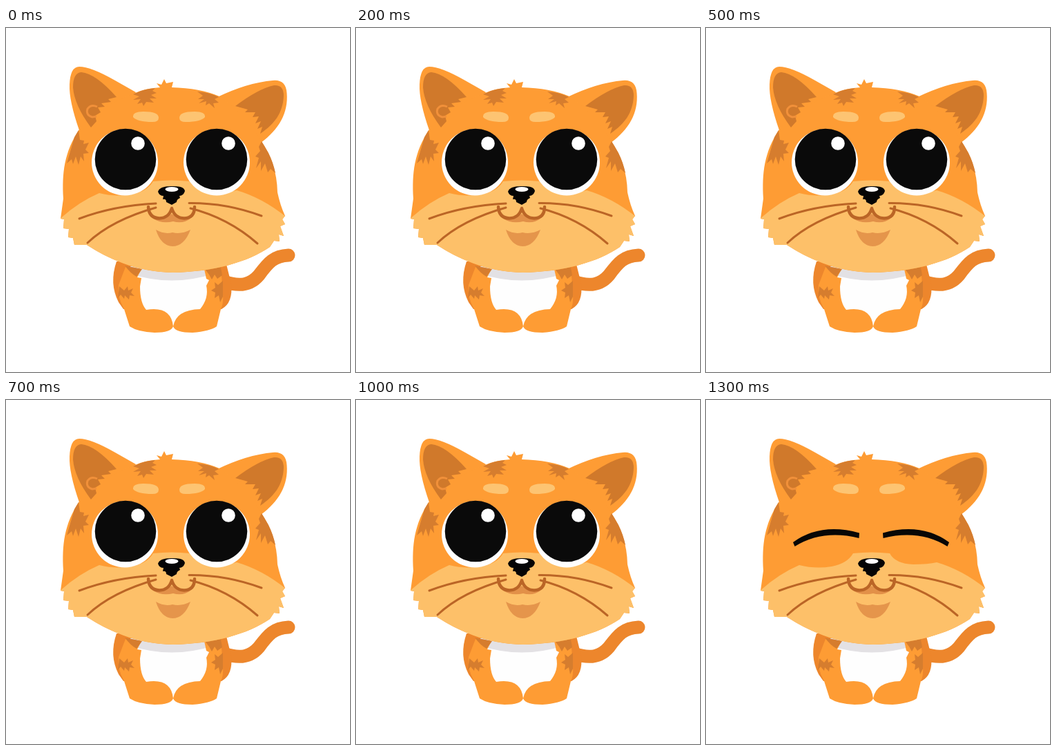
Animation of 498x498 px, one loop 1400 ms. Source, as an HTML page:

```html
<!DOCTYPE html>
<html lang="en">
<head>
<meta charset="utf-8">
<title>Blinking cat</title>
<style>
html, body { margin: 0; width: 100%; height: 100%; overflow: hidden; background: #fff; }
svg { display: block; width: 100vw; height: 100vh; }
.coat { fill: #fe9c34; }
.inner { fill: #d0792b; }
.stripe { fill: #d67d2e; }
.cream { fill: #fdc069; }
.brow { fill: #fdc472; }
.back { fill: #ed862c; }
.brown { fill: none; stroke: #bb6526; stroke-linecap: round; stroke-linejoin: round; }
</style>
</head>
<body>
<svg viewBox="0 0 498 498">
  <!-- tail -->
  <path d="M316 367C338 375 354 372 366 358C380 339 388 330 409 329" fill="none" stroke="#ed862c" stroke-width="19" stroke-linecap="round"/>

  <!-- body -->
  <path class="back" d="M160 338Q149 370 163 397L170 407H312Q329 398 326 370L318 338Z"/>
  <path fill="#fefefe" d="M185 345H298V390L283 410L242 434L202 410L187 390Z"/>
  <path fill="#e3e1e4" d="M180 345H300V356Q240 375 180 356Z"/>
  <path class="coat" d="M173 346L196 349L190 361L196 362L194 374Q194 398 203 408Q239 402 242 432Q239 441 215 441Q191 440 179 432L171 407Q161 390 163 372Z"/>
  <path class="coat" d="M311 346L287 349L290 363L294 365L290 373Q294 391 281 407Q246 408 242 432Q245 441 270 441Q295 439 305 432L311 407Q315 400 314 385Z"/>
  <path class="stripe" d="M172 344L197 349L189 360Q180 355 172 344Z"/>
  <path class="stripe" d="M164 374L171 380L176 374L177 380L184 377L181 383L186 388L179 387L178 393L172 387L171 392L166 386L162 391Z"/>
  <path class="stripe" d="M288 349L311 346L313 358L306 363L302 357L298 364L294 357Z"/>
  <path class="stripe" d="M314 366L307 372L302 368L303 376L297 380L303 383L302 391L308 387L310 397L314 389Z"/>

  <!-- ears and head -->
  <path class="coat" d="M106 148Q91 105 92 82Q93 56 106 56Q123 56 158 76L188 93L165 140Z"/>
  <path class="coat" d="M306 100Q350 79 386 76Q405 74 406.500 94C409 123 395 147 369 166L330 145Z"/>
  <path id="head" class="coat" d="M187 94Q203 87 223 86L218 80L225 82L229 74L232 80L242 78L240 86Q281 87 309 99Q348 126 369 163Q392 195 393 238Q397 257 404 272L400 277L404 284L397 287L402 301L395 299L396 309L388 308L382 317C350 339 300 353 241 354C187 353 147 333 117 314L99 314L97 304L90 303L91 291L83 290L84 277L79 276L83 247C81 210 84 180 106 147Q136 112 187 94Z"/>
  <path class="inner" d="M123 144Q99 112 97 86Q97 65 109 64Q130 66 160 100L148 103L152 107L138 109L143 114L133 115L137 122L129 127L131 135Z"/>
  <path d="M132 114Q123 110 118 117Q115 126 125 129L131 128" fill="none" stroke="#f1903a" stroke-width="3"/>
  <path class="inner" d="M332 113Q365 88 388 83Q402 82 402 98C401 122 390 138 368 153L371 143L364 146L369 135L361 138L366 128L357 129L361 122L346 122L350 118Z"/>
  <clipPath id="face"><use href="#head"/></clipPath>
  <path class="cream" clip-path="url(#face)" d="M70 284Q100 254 135 239Q158 245 182 241Q204 237 213 222Q240 219 266 222Q274 237 300 238Q322 238 334 235Q375 247 412 279V360H70Z"/>

  <!-- markings -->
  <path class="stripe" d="M88 196L99 158L105 148L107 162L113 163L112 168L120 166L115 176L120 181L112 182L113 193L108 186L105 198L101 186L97 197L95 190Z"/>
  <path class="stripe" d="M370 164L380 181Q387 195 390 210L383 204L379 209L375 196L369 207L369 193L362 203L366 188L361 186L368 178L366 172Z"/>
  <path class="stripe" d="M184 96Q199 88 216 87L212 91L218 94L210 97L218 102L208 102L214 108L203 107L199 113L197 108L190 110L195 103L184 104L193 99Z"/>
  <path class="stripe" d="M277 92Q294 93 308 100L302 103L308 108L300 109L302 116L294 109L289 112L290 106L279 109L287 103L278 103L285 98Z"/>
  <path class="brow" d="M184 129Q183 121 199 121Q221 121 221 130Q221 136 212 136Q190 136 184 129Z"/>
  <path class="brow" d="M288 129Q289 121 273 121Q251 121 251 130Q251 136 260 136Q282 136 288 129Z"/>

  <!-- eyes -->
  <g id="open"></g>
  <g id="shut" fill="#080706">
    <path d="M126 206Q166 177 222 192.500L221.500 200Q169 187 128.500 212Z"/>
    <path d="M352 206Q312 177 256 192.500L256.500 200Q309 187 349.500 212Z"/>
  </g>

  <!-- nose, mouth, whiskers -->
  <path fill="#e29048" d="M213 276Q230 277 240 269Q250 277 267 276Q256 284 242 280Q226 284 213 276Z"/>
  <path fill="#e5954b" d="M217 292Q229 299 241 296Q254 299 267 292Q258 316 241 316Q224 315 217 292Z"/>
  <path class="brown" stroke-width="4.500" d="M206 259Q207 275 222 275.500Q236 275 240 261Q244 275 258 275.500Q273 275 273 259"/>
  <path fill="#050505" d="M220 237Q222 229 239 229Q258 228 259 236Q257 243 251 243L252 246Q247 248 247 252L240 256L232 252Q232 247 227 248L228 243Q222 243 220 237Z"/>
  <ellipse cx="240" cy="233.500" rx="9.500" ry="3.400" fill="#fff"/>
  <g class="brown" stroke-width="3">
    <path d="M106 276Q156 257 217 254"/>
    <path d="M118 311Q153 278 217 260"/>
    <path d="M265 253.500Q319 253 370 272"/>
    <path d="M267 261Q322 275 364 312"/>
  </g>
</svg>
<script>
const LOOP = 1400, BLINK = 1100;
const open = document.getElementById("open");
const shut = document.getElementById("shut");

const disc = (x, y, r, fill) => `<circle cx="${x}" cy="${y}" r="${r}" fill="${fill}"/>`;
const eye = (x, lean, shine) =>
  disc(x + lean, 194.5, 48, "#fefefe") + disc(x, 190, 44.3, "#0a0a0a") + disc(x + shine, 167, 9.8, "#fff");
open.innerHTML = eye(173, -1, 18) + eye(305, 0, 17);

function draw(ms) {
  const closed = ms % LOOP >= BLINK;
  open.style.display = closed ? "none" : "";
  shut.style.display = closed ? "" : "none";
}

const start = performance.now();
function tick() {
  draw(performance.now() - start);
  requestAnimationFrame(tick);
}
tick();
</script>
</body>
</html>
```
